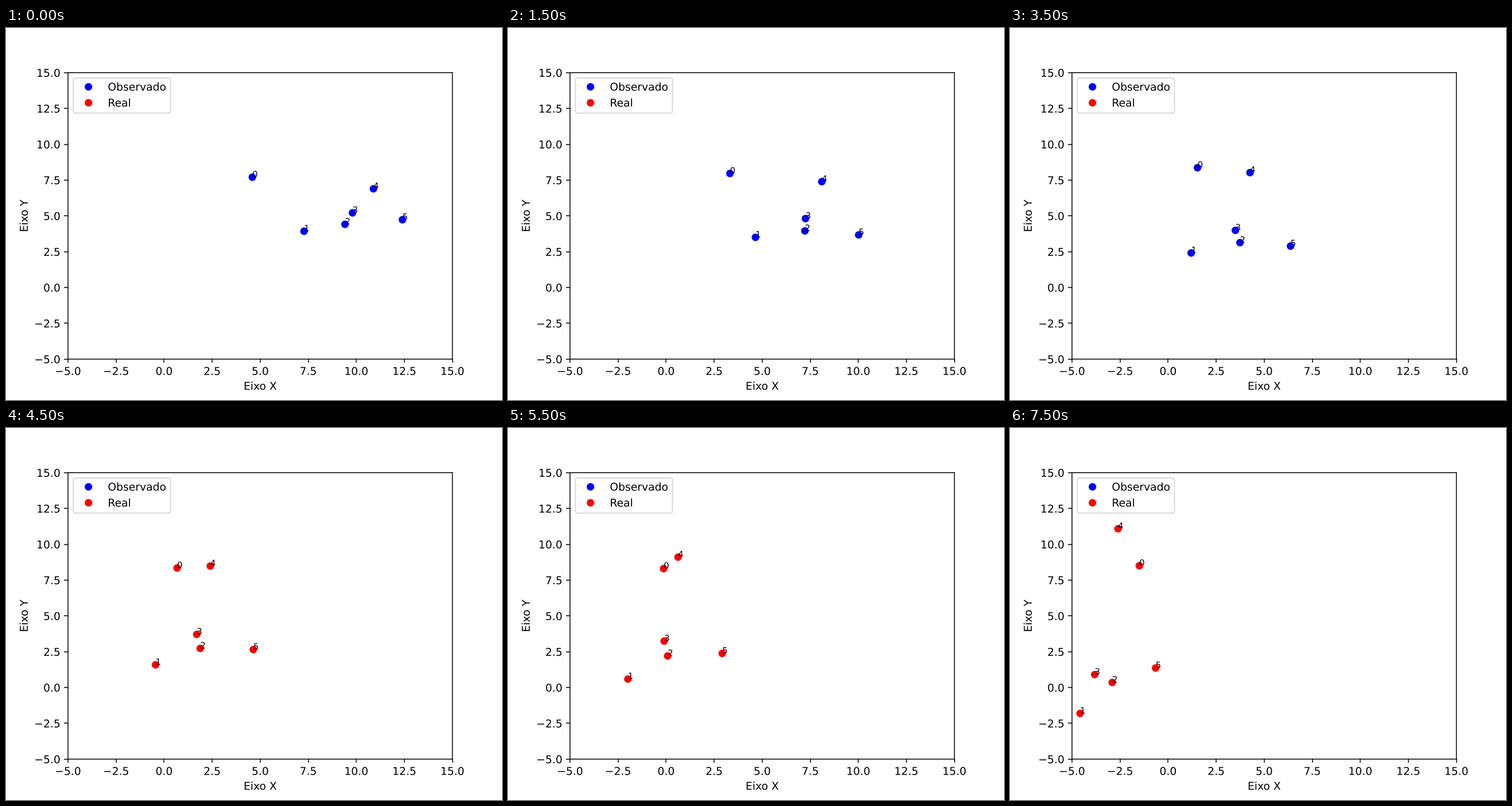
These frames come from a looping animation (864x648 px, 8000 ms). A matplotlib script:

```python
import numpy as np
import matplotlib.pyplot as plt
from matplotlib.animation import FuncAnimation
from matplotlib.patheffects import Normal

STEPS = 16
INTERVAL = 500
OBSERVED_STEPS = 8
WIDTH, HEIGHT, DPI = 864, 648, 135

# Draw text and markers as unsnapped paths for sub-pixel placement.
plt.rcParams.update({"path.effects": [Normal()], "path.snap": False,
                     "text.hinting": "none"})

# Key poses of the six points, in axis units.
KEY_STEPS = np.array([0, 3, 7, 11, 15])
KEY_POSES = np.array([
    [(4.59, 7.70), (7.28, 3.93), (9.41, 4.41), (9.80, 5.21), (10.89, 6.89), (12.40, 4.73)],
    [(3.32, 7.96), (4.65, 3.50), (7.22, 3.95), (7.25, 4.81), (8.10, 7.39), (10.02, 3.67)],
    [(1.53, 8.36), (1.20, 2.41), (3.74, 3.13), (3.50, 3.99), (4.26, 8.02), (6.37, 2.89)],
    [(-0.13, 8.30), (-1.99, 0.59), (0.08, 2.20), (-0.10, 3.24), (0.62, 9.10), (2.92, 2.38)],
    [(-1.50, 8.50), (-4.58, -1.81), (-2.91, 0.35), (-3.82, 0.90), (-2.61, 11.08), (-0.65, 1.36)],
])
SLOPES = np.gradient(KEY_POSES, KEY_STEPS, axis=0)


def pose(step):
    """Cubic Hermite blend of the two key poses around a step."""
    i = min(np.searchsorted(KEY_STEPS, step, side="right"), len(KEY_STEPS) - 1) - 1
    span = KEY_STEPS[i + 1] - KEY_STEPS[i]
    u = (step - KEY_STEPS[i]) / span
    ease = u * u * (3 - 2 * u)
    bend = u * (1 - u) * span * ((1 - u) * SLOPES[i] - u * SLOPES[i + 1])
    return (1 - ease) * KEY_POSES[i] + ease * KEY_POSES[i + 1] + bend


fig, ax = plt.subplots(figsize=(WIDTH / DPI, HEIGHT / DPI), dpi=DPI)
ax.set(xlim=(-5, 15), ylim=(-5, 15), xlabel="Eixo X", ylabel="Eixo Y")
observed, = ax.plot([], [], "bo", label="Observado")
real, = ax.plot([], [], "ro", label="Real")
ax.legend(loc="upper left")
labels = [ax.text(0, 0, str(i), fontsize=8) for i in range(KEY_POSES.shape[1])]


def update(step):
    points = pose(step)
    shown, hidden = (observed, real) if step < OBSERVED_STEPS else (real, observed)
    shown.set_data(points[:, 0], points[:, 1])
    hidden.set_data([], [])
    for label, point in zip(labels, points):
        label.set_position(point)
    return [observed, real, *labels]


anim = FuncAnimation(fig, update, frames=STEPS, interval=INTERVAL,
                     repeat=True, repeat_delay=0)
plt.show()
```
